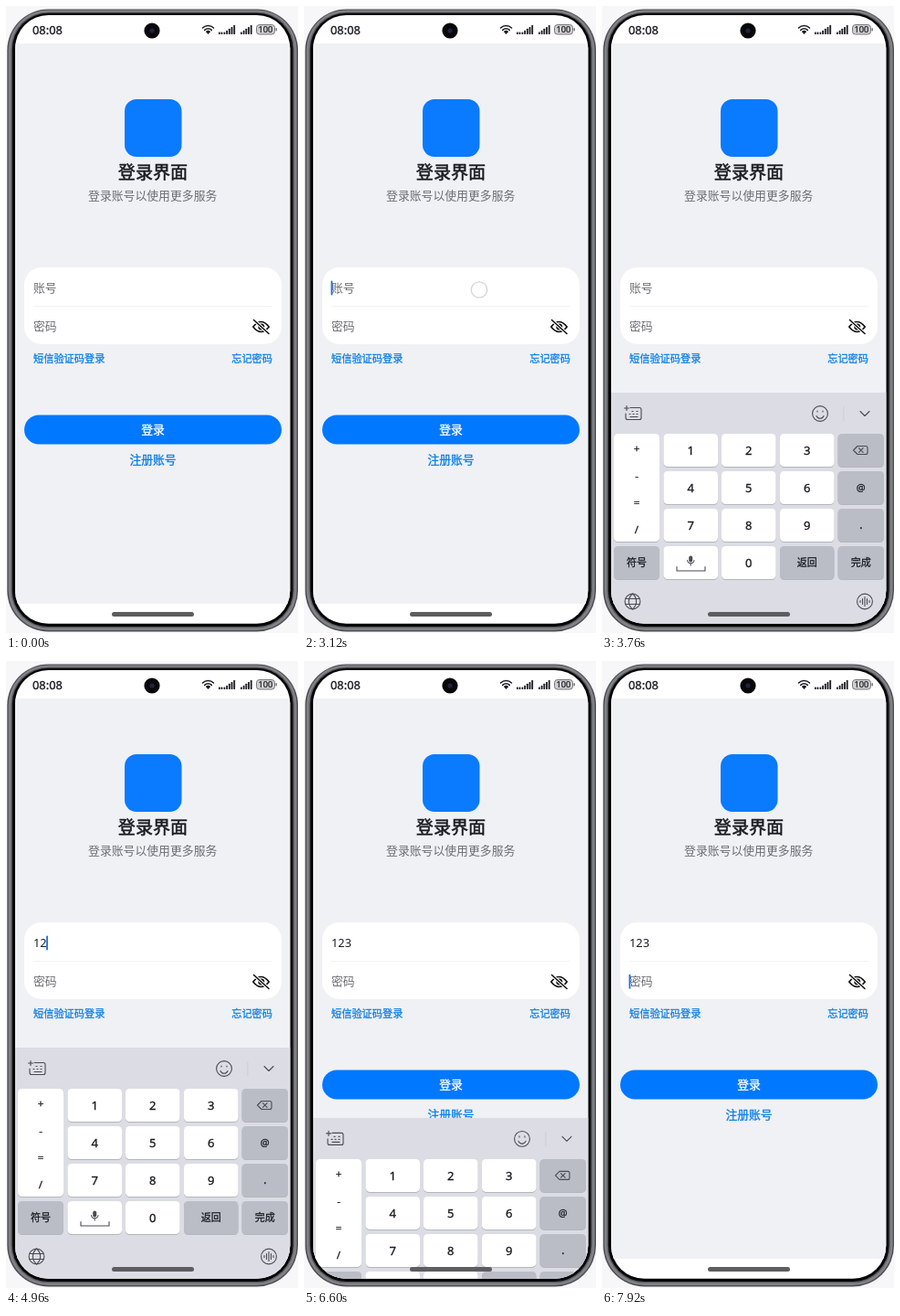
An HTML page for the animation above (8 s loop, 320x686 px).

```html
<!DOCTYPE html>
<html lang="zh-CN">
<head>
<meta charset="utf-8">
<title>登录界面</title>
<style>
  html, body { margin: 0; width: 100%; height: 100%; overflow: hidden; background: #f7f6f9; }
  svg { display: block; width: 320px; height: 686px; }
  text { font-family: "Noto Sans", "Noto Sans CJK SC", "Noto Sans CJK", sans-serif; }
  .line { fill: none; stroke: #4a4c52; stroke-width: 1.1; stroke-linecap: round; stroke-linejoin: round; }
</style>
</head>
<body>
<svg id="stage" viewBox="0 0 320 686"></svg>
<script>
const LOOP = 8000, KEYBOARD_HEIGHT = 257, BLUE = '#0a7fe6', INK = '#1a1c22', HINT = '#6c6e74';

// Shape helpers; text is centred vertically on y.
const rect = (x, y, w, h, r, fill, extra = '') =>
  `<rect x="${x}" y="${y}" width="${w}" height="${h}" rx="${r}" fill="${fill}" ${extra}/>`;
const circle = (x, y, r, extra) => `<circle cx="${x}" cy="${y}" r="${r}" ${extra}/>`;
const line = (d, extra = '') => `<path class="line" d="${d}" ${extra}/>`;

// A hairline outline stands in for the medium weight of the CJK font.
const text = (x, y, size, str, fill = INK, anchor = 'middle', medium = false, id = '') =>
  `<text id="${id}" x="${x}" y="${y + size * 0.37}" font-size="${size}" fill="${fill}" text-anchor="${anchor}"
    ${medium ? `font-weight="500" stroke="${fill}" stroke-width="${size * 0.025}"` : ''}>${str}</text>`;

function signal(x) {
  return [0, 1, 2, 3, 4].map(i => rect(x + i * 2.7, 28.6 - i * 1.9, 1.8, 2.4 + i * 1.9, 0.4, INK)).join('');
}

function statusBar() {
  return text(29, 26.3, 12.9, '08:08', INK, 'start', true)
    + circle(160, 27, 8.6, 'fill="#08080a"') + circle(160, 27, 2.6, 'fill="#1d2340"')
    + line('M215.5 24a8.5 8.5 0 0 1 12 0M217.7 26.4a5.4 5.4 0 0 1 7.6 0', 'style="stroke:#1a1c22;stroke-width:1.5"')
    + `<path d="M218.8 28a4 4 0 0 1 5.4 0l-2.7 3z" fill="${INK}"/>`
    + rect(233, 28.5, 1.7, 2.5, 0.3, INK) + rect(235.6, 28.5, 1.7, 2.5, 0.3, INK)
    + signal(238.5) + signal(257)
    + rect(274.5, 20.5, 20, 10.5, 3.2, '#cfcfd1', 'stroke="#77787a"')
    + rect(295.5, 24, 1.5, 3.5, 0.7, '#77787a')
    + text(284.5, 25.8, 9.2, '100', INK, 'middle', true);
}

function eye() {
  const slash = 'M271.5 343.5L288 358.5';
  return line('M270.8 351Q279.5 340 288.2 351Q279.5 362 270.8 351z', 'style="stroke:#111;stroke-width:1.7"')
    + circle(279.8, 351, 3.5, 'fill="#111"')
    + line(slash, 'style="stroke:#fff;stroke-width:3.6"')
    + line(slash, 'style="stroke:#111;stroke-width:1.6"');
}

function page() {
  return rect(9, 41, 304, 613, 0, '#f0f1f5')
    + rect(130, 102, 62.5, 63, 13, '#0a7aff')
    + text(161, 182, 19.1, '登录界面', INK, 'middle', true)
    + text(160.7, 207.5, 12.85, '登录账号以使用更多服务', HINT)
    + rect(20, 286, 282, 84, 19, '#fff')
    + rect(30, 328, 262, 0.8, 0, '#eff0f2')
    + text(30, 308, 12.8, '账号', HINT, 'start', false, 'account')
    + text(30, 350.5, 12.8, '密码', HINT, 'start')
    + eye()
    + text(30, 385.7, 11.2, '短信验证码登录', BLUE, 'start', true)
    + text(292, 385.7, 11.2, '忘记密码', BLUE, 'end', true)
    + rect(20, 447.5, 282, 32, 16, '#0078ff')
    + text(161, 463.5, 12.8, '登录', '#fff', 'middle', true)
    + text(161, 496.5, 12.8, '注册账号', BLUE, 'middle', true)
    + rect(30, 300.5, 1.8, 16, 0.9, '#1f6fe0', 'id="cursor"');
}

const columns = [67.5, 131, 195], rows = [468, 509, 550, 591];

function key(x, y, w, label, grey, size = 13, h = 36) {
  return rect(x, y + 1, w, h, 4.5, '#b4b6be')
    + rect(x, y, w, h, 4.5, grey ? '#babdc6' : '#fff', `id="key${label}"`)
    + text(x + w / 2, y + h / 2, size, label, INK, 'middle', true);
}

function keyboard() {
  let out = rect(9, 423, 304, 300, 0, '#dcdde4');
  // Toolbar
  out += line('M31 439.5H41q2 0 2 2v9q0 2-2 2H28q-2 0-2-2V446M27 437.5v5M24.5 440h5M33 443.5h1M38 443.5h1M30 446.5h1M34 446.5h1M38 446.5h1M31 449.5h8')
    + circle(239, 446, 8.4, 'class="line"')
    + line('M235 448.5a4.3 4.3 0 0 0 8 0M236 443v1M242 443v1')
    + rect(264.5, 438, 0.8, 16, 0, '#c9cbd2')
    + line('M283 443.5l5 5l5-5');
  // Left symbol strip
  out += key(13, rows[0], 50, '', false, 12, 118)
    + ['+', '-', '=', '/'].map((s, i) => text(38, 484 + i * 29.5, 11.5, s, INK, 'middle', true)).join('');
  // Digits
  for (let n = 1; n <= 9; n++)
    out += key(columns[(n - 1) % 3], rows[Math.floor((n - 1) / 3)], 59.5, n);
  // Right column and bottom row
  out += key(258.5, rows[0], 50.5, '', true) + key(258.5, rows[1], 50.5, '@', true, 11)
    + key(258.5, rows[2], 50.5, '.', true, 12)
    + line('M280 481.5h9q2 0 2 2v5q0 2-2 2h-9l-4.5-4.500zM281.5 483.7l4.6 4.6M286.1 483.7l-4.6 4.6')
    + key(13, rows[3], 50, '符号', true, 11) + key(columns[0], rows[3], 59.5, '', false)
    + key(columns[1], rows[3], 59.5, '0', false) + key(columns[2], rows[3], 59.5, '返回', true, 11)
    + key(258.5, rows[3], 50.5, '完成', true, 11)
    + rect(95.2, 601.5, 4, 7, 2, '#4a4c52')
    + line('M93.5 606.5a3.8 3.8 0 0 0 7.5 0M97.2 610.5v1.5M82 613.5v4.5h31v-4.5');
  // Globe and voice
  out += circle(33.5, 651.5, 8.4, 'class="line"')
    + line('M33.5 643c-5.5 5-5.5 12 0 17c5.5-5 5.5-12 0-17M26 648.5h15M26 654.5h15')
    + circle(288, 651.5, 8.4, 'class="line"')
    + line('M283 650.5v2M285.5 648.5v6M288 646.5v10M290.5 648.5v6M293 650.5v2');
  return `<g id="keyboard">${out}</g>`;
}

// Phone body outline, inset evenly from its outer edge
const shell = (inset, fill, extra) =>
  rect(1.3 + inset, 3.5 + inset * 0.75, 318.7 - inset * 2, 681 - inset * 1.75, 45 - inset, fill, extra);

const stage = document.getElementById('stage');
stage.innerHTML = `<clipPath id="screen">${shell(8.7, '#fff')}</clipPath>`
  + rect(318.5, 197, 1.5, 10, 0.5, '#3b3d40') + rect(318.5, 226, 1.5, 40, 0.5, '#3b3d40')
  + shell(0, '#4b4d51') + shell(1.4, '#808287') + shell(4.2, '#55575b') + shell(5.6, '#060607')
  + `<g clip-path="url(#screen)">${rect(9, 9, 304, 668, 0, '#fff')}${statusBar()}${page()}${keyboard()}</g>`
  + rect(116, 663, 90, 5, 2.5, '#5d5d60')
  + circle(0, 0, 8.7, 'id="touch" fill="#fff" fill-opacity=".6" stroke="#d2d3d6" stroke-width="1.3"');

const $ = id => document.getElementById(id);
const account = $('account'), cursor = $('cursor'), panel = $('keyboard'), touch = $('touch');

const taps = [
  { at: 3120, end: 3160, x: 192, y: 310.5 },
  { at: 4440, end: 4560, typed: 4520, x: 97, y: 486, key: 1 },
  { at: 4800, end: 4960, typed: 4880, x: 161, y: 486, key: 2 },
  { at: 5280, end: 5400, typed: 5360, x: 225, y: 486, key: 3 },
  { at: 6400, end: 6480, x: 288, y: 446 },
  { at: 7440, end: 7520, x: 189, y: 350.5 }
];
const digitTaps = taps.filter(tap => tap.key);

// cubic-bezier(.2, 0, .2, 1), solved by bisection
function ease(p) {
  if (p <= 0 || p >= 1) return p <= 0 ? 0 : 1;
  let lo = 0, hi = 1;
  for (let i = 0; i < 24; i++) {
    const s = (lo + hi) / 2;
    if (0.6 * s * (1 - s) + s ** 3 < p) lo = s; else hi = s;
  }
  return lo * lo * (3 - 2 * lo);
}

function draw(t) {
  const shown = ease((t - 3240) / 440) - ease((t - 6519) / 440);
  panel.setAttribute('transform', `translate(0 ${(1 - shown) * KEYBOARD_HEIGHT})`);

  const entered = digitTaps.filter(tap => t >= tap.typed);
  account.textContent = entered.map(tap => tap.key).join('') || '账号';
  account.setAttribute('fill', entered.length ? INK : HINT);

  // The blink restarts with every typed digit.
  const inPassword = t >= 7440;
  const blinkStart = entered.length ? entered[entered.length - 1].typed : 3120;
  const blinkOn = t >= 3120 && t < 6480 && Math.floor((t - blinkStart) / 520) % 2 === 0;
  cursor.style.display = inPassword || blinkOn ? '' : 'none';
  cursor.setAttribute('x', inPassword ? 29.5 : 29.5 + entered.length * 7.32);
  cursor.setAttribute('y', inPassword ? 342.7 : 300.5);

  const tap = taps.find(tap => t >= tap.at && t < tap.end);
  touch.style.display = tap && t < (tap.typed || tap.end) ? '' : 'none';
  if (tap) touch.setAttribute('transform', `translate(${tap.x} ${tap.y})`);
  for (const { key } of digitTaps)
    $('key' + key).setAttribute('fill', tap && tap.key === key ? '#d0d2d9' : '#fff');
}

function tick() {
  draw(performance.now() % LOOP);
  requestAnimationFrame(tick);
}
tick();
</script>
</body>
</html>
```
